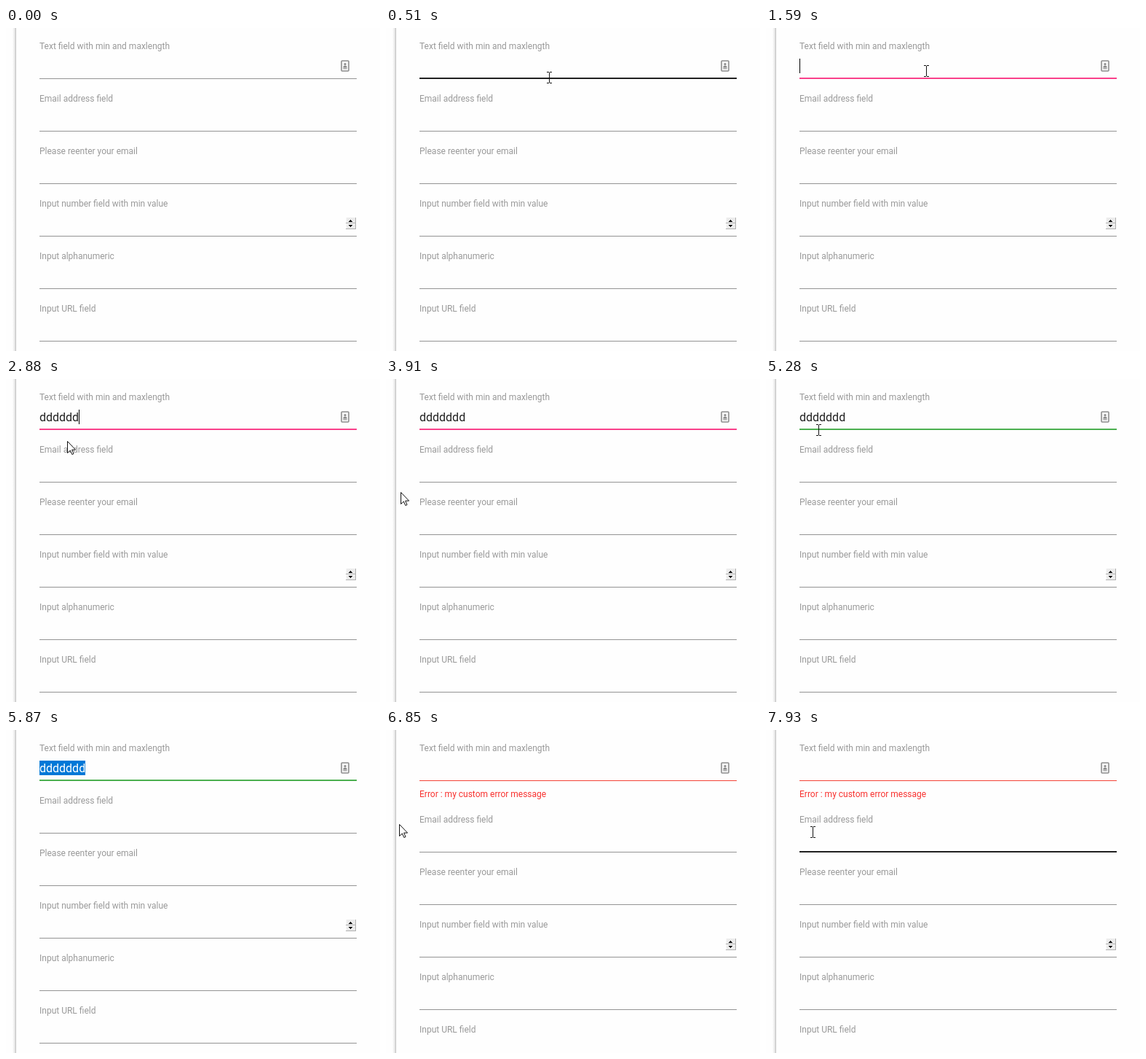
Recreate the animation shown at these times as an HTML page. Size 514 by 443 pixels, loop 7.99 s.

```html
<!DOCTYPE html>
<html lang="en">
<head>
<meta charset="utf-8">
<title>Form validation</title>
<style>
  html, body { margin: 0; width: 100%; height: 100%; overflow: hidden; background: #fefefe; }
  svg { display: block; width: 514px; height: 443px; }
  text { font: 12px Roboto, Arial, sans-serif; fill: #999; }
  #value { font-size: 16px; fill: #212121; }
  #error { fill: #f8322f; }
  .crisp { shape-rendering: crispEdges; }
</style>
</head>
<body>
<svg viewBox="0 0 514 443">
  <defs>
    <linearGradient id="shade">
      <stop offset="0" stop-color="#fdfdfd"/>
      <stop offset=".5" stop-color="#ececec"/>
      <stop offset="1" stop-color="#c2c2c2"/>
    </linearGradient>
  </defs>
  <rect x="9" width="5" height="443" fill="url(#shade)"/>

  <g id="first"></g>
  <g id="rest">
    <g class="crisp">
      <rect x="467" y="260" width="14" height="16" fill="#ececec"/>
      <path d="M467.5 260V276M467 268.5H481" stroke="#f8f8f8"/>
      <path d="M480.5 260V276M467 275.5H481M467 267.5H481" stroke="#b0b0b0"/>
      <path d="M471 266l2.5-3.5l2.5 3.5zM471 270l2.5 3.5l2.5-3.5z" fill="#000"/>
    </g>
  </g>

  <g fill="#8a8a8a">
    <rect x="461" y="45" width="10" height="14" rx="1" fill="#f6f6f6" stroke="#8e8e8e" stroke-width="1.6"/>
    <circle cx="466" cy="49.6" r="1.5"/>
    <path d="M463.4 54.4q0-2.8 2.6-2.8t2.6 2.8zM463.4 55.3h5.2v1h-5.2z"/>
  </g>

  <rect id="select" class="crisp" x="46" y="42" width="63" height="20" fill="#0078d7"/>
  <text id="value" x="46" y="58"></text>
  <rect id="caret" class="crisp" y="42" width="1" height="20" fill="#000"/>
  <text id="error" x="46" y="92">Error : my custom error message</text>

  <path id="arrow" d="M.5 .5V16.5L4.3 13L6.8 18.5L9 17.5L6.6 12.1H11.6Z" fill="#fff" stroke="#111"/>
  <path id="beam" class="crisp" d="M-3 -7.5H0M1 -7.5H4M.5 -7V7M-3 7.5H0M1 7.5H4" fill="none" stroke="#111"/>
</svg>
<script>
const LOOP = 7990, LEFT = 46, RIGHT = 482, PITCH = 72, SHIFT = 26;
const GREY = '#949494', BLACK = '#212121', PINK = '#f9408a', GREEN = '#4caf50', RED = '#f44336';
const FOCUS = 1070, BLUR = 4290, CHECKED = 4600, REFOCUS = 5430, SELECT = 5720, CLEAR = 6410, LEAVE = 6710, FAIL = 6850;
const TYPE_START = 1970, TYPE_STEP = 175, LETTERS = 7, BLINK = 530;
const labels = ['Text field with min and maxlength', 'Email address field', 'Please reenter your email',
  'Input number field with min value', 'Input alphanumeric', 'Input URL field'];

// each visit of the pointer: where it enters, its moves, when it goes
const visits = [
  { enter: 150, leave: 3300, at: [242, 338], moves: [
    { from: 150, to: 590, at: [220, 59] },
    { from: 2490, to: 2880, at: [84, 85] },
    { from: 2880, to: 3020, at: [21, 89] },
    { from: 3130, to: 3300, at: [3, 111] }] },
  { enter: 3910, leave: 5870, at: [20, 155], moves: [
    { from: 4130, to: 4600, at: [24, 141] },
    { from: 5100, to: REFOCUS, at: [112, 52] }] },
  { enter: CLEAR, leave: LOOP, at: [4, 124], moves: [
    { from: CLEAR, to: 6550, at: [18, 129] },
    { from: 7520, to: 7620, at: [21, 116] },
    { from: 7820, to: 7930, at: [64, 140] }] }
];

const $ = id => document.getElementById(id);
const clamp = v => Math.min(1, Math.max(0, v));
const within = (t, a, b) => t >= a && t < b;
const lineY = i => 69 + i * PITCH;
const add = (parent, tag, attrs, text = '') => {
  const el = document.createElementNS('http://www.w3.org/2000/svg', tag);
  for (const k in attrs) el.setAttribute(k, attrs[k]);
  el.textContent = text;
  return parent.appendChild(el);
};
const show = (el, on) => el.setAttribute('visibility', on ? 'visible' : 'hidden');

const fields = labels.map((label, i) => {
  const parent = $(i ? 'rest' : 'first'), y = lineY(i);
  const box = { class: 'crisp', x: LEFT, width: RIGHT - LEFT };
  add(parent, 'text', { x: LEFT, y: y - 40 }, label);
  return {
    thin: add(parent, 'rect', { ...box, y, height: 1, fill: GREY }),
    thick: add(parent, 'rect', { ...box, y: y - 1, height: 2 })
  };
});

function pointer(t) {
  const visit = visits.find(v => within(t, v.enter, v.leave));
  if (!visit) return null;
  let [x, y] = visit.at;
  for (const { from, to, at } of visit.moves) {
    const k = clamp((t - from) / (to - from));
    x += (at[0] - x) * k;
    y += (at[1] - y) * k * (2 - k);
  }
  return { x: Math.round(x), y: Math.round(y) };
}

function drawValue(t) {
  const typed = Math.floor((t - TYPE_START) / TYPE_STEP) + 1;
  const count = t < CLEAR ? Math.min(LETTERS, Math.max(0, typed)) : 0;
  const selected = within(t, SELECT, CLEAR);
  $('value').textContent = 'd'.repeat(count);
  $('value').style.fill = selected ? '#fff' : '';
  show($('select'), selected);

  // the caret starts a new blink at every edit
  const lastEdit = t >= CLEAR ? CLEAR : count ? TYPE_START + (count - 1) * TYPE_STEP : FOCUS;
  const focused = within(t, FOCUS, BLUR) || within(t, CLEAR, LEAVE);
  $('caret').setAttribute('x', LEFT + count * 9);
  show($('caret'), focused && (t - lastEdit) % (2 * BLINK) < BLINK);
}

function drawLines(t, p, shift) {
  const status = t >= FAIL ? RED : t >= CHECKED ? GREEN : GREY;
  const inside = p && within(p.x, LEFT, RIGHT);
  let overInput = false;
  fields.forEach(({ thin, thick }, i) => {
    const gap = inside ? lineY(i) + (i ? shift : 0) - p.y : Infinity;
    const hover = within(gap, -1, 47);
    if (within(gap, -1, 33)) overInput = true;
    let color = BLACK, alpha = hover ? 1 : 0;
    if (i === 0) {
      thin.setAttribute('fill', status);
      if (within(t, FOCUS, CHECKED)) {
        color = PINK;
        alpha = clamp((CHECKED - t) / 100);
      } else if (status !== GREY) {
        color = status;
        if (within(t, REFOCUS, FAIL)) alpha = 1;
      }
    }
    thick.setAttribute('fill', color);
    thick.setAttribute('opacity', alpha);
  });
  return overInput;
}

function draw(t) {
  const shift = t >= FAIL ? SHIFT : 0, p = pointer(t);
  $('rest').setAttribute('transform', `translate(0 ${shift})`);
  show($('error'), t >= FAIL);
  drawValue(t);
  const shape = drawLines(t, p, shift) ? 'beam' : 'arrow';
  for (const id of ['arrow', 'beam']) {
    show($(id), p && id === shape);
    if (p) $(id).setAttribute('transform', `translate(${p.x} ${p.y})`);
  }
}

const start = performance.now();
function tick() {
  draw((performance.now() - start) % LOOP);
  requestAnimationFrame(tick);
}
tick();
</script>
</body>
</html>
```
